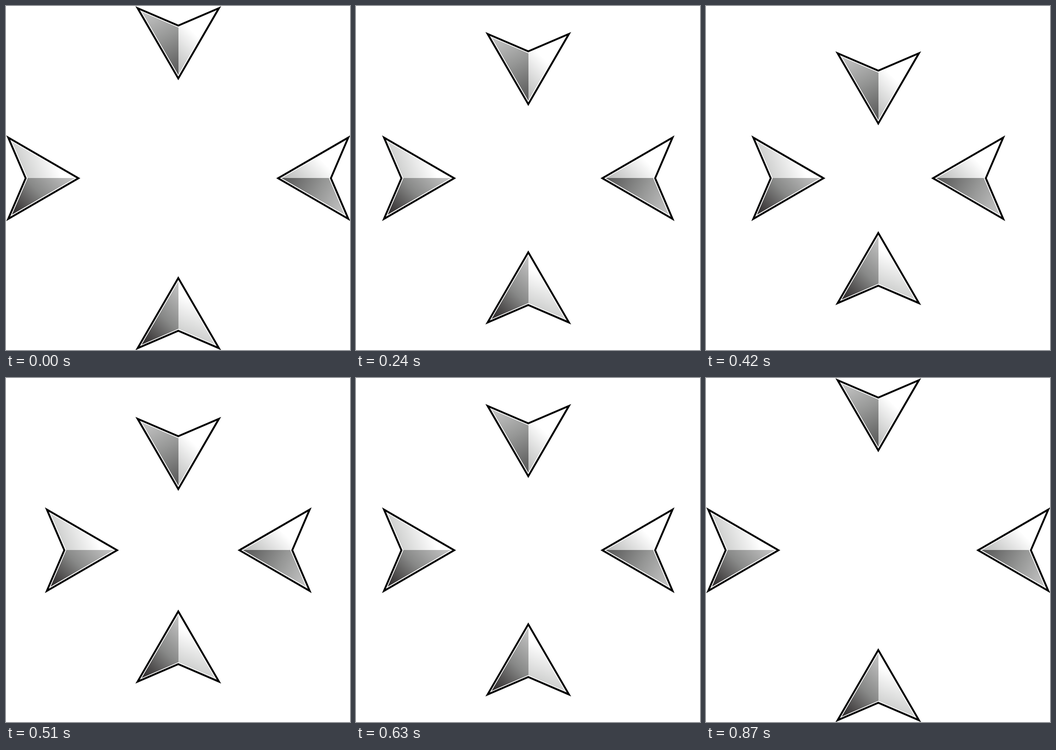
These frames come from a looping animation (748 px wide and 748 px high, 0.9 s). An HTML page:

```html
<!DOCTYPE html>
<html lang="en">
<head>
<meta charset="utf-8">
<title>Converging arrows</title>
<style>
html, body { margin: 0; width: 100%; height: 100%; overflow: hidden; background: #fff; }
svg { display: block; width: 748px; height: 748px; }
.half { shape-rendering: crispEdges; }
.line { fill: none; stroke-miterlimit: 10; }
</style>
</head>
<body>
<svg viewBox="0 0 748 748">
  <defs>
    <linearGradient id="topDark" gradientUnits="userSpaceOnUse" x1="-80" y1="-361" x2="-9" y2="-219">
      <stop offset="0" stop-color="#c6c6c6"/>
      <stop offset=".45" stop-color="#969796"/>
      <stop offset="1" stop-color="#555"/>
    </linearGradient>
    <linearGradient id="topLight" gradientUnits="userSpaceOnUse" x1="80" y1="-361" x2="-28" y2="-253">
      <stop offset=".42" stop-color="#fff"/>
      <stop offset="1" stop-color="#b8b9b8"/>
    </linearGradient>
    <linearGradient id="lowDark" gradientUnits="userSpaceOnUse" x1="0" y1="225" x2="-108" y2="333">
      <stop offset="0" stop-color="#c6c6c6"/>
      <stop offset=".5" stop-color="#888988"/>
      <stop offset="1" stop-color="#2a2627"/>
    </linearGradient>
    <linearGradient id="lowLight" gradientUnits="userSpaceOnUse" x1="0" y1="225" x2="-36" y2="315">
      <stop offset=".25" stop-color="#fff"/>
      <stop offset="1" stop-color="#d0d1d0"/>
    </linearGradient>
    <g id="top">
      <path class="half" fill="url(#topDark)" d="M0-217L-88.5-369.8 0-331.8z"/>
      <path class="half" fill="url(#topLight)" d="M0-217L88.5-369.8 0-331.8z"/>
      <path id="edge" class="line" d="M0-217L-88.5-369.8 0-331.8 88.5-369.8z" stroke="#fff" stroke-width="7.6"/>
      <path class="line" d="M0-217L-88.5-369.8 0-331.8 88.5-369.8z" stroke="#000" stroke-width="4"/>
    </g>
    <g id="low">
      <path class="half" fill="url(#lowDark)" d="M0 217L-88.5 369.8 0 331.8z"/>
      <path class="half" fill="url(#lowLight)" d="M0 217L88.5 369.8 0 331.8z"/>
      <path class="line" d="M0 217L-88.5 369.8 0 331.8 88.5 369.8z" stroke="#fff" stroke-width="7.6"/>
      <path class="line" d="M0 217L-88.5 369.8 0 331.8 88.5 369.8z" stroke="#000" stroke-width="4"/>
    </g>
  </defs>
  <g transform="translate(374.6 374.4)">
    <use href="#top" data-dir="1"/>
    <use href="#low" data-dir="-1"/>
    <!-- The side arrows mirror the vertical pair across the diagonal. -->
    <g transform="matrix(0 -1 -1 0 0 0)">
      <use href="#top" data-dir="1"/>
      <use href="#low" data-dir="-1"/>
    </g>
  </g>
</svg>
<script>
const LOOP = 900, TICK = 30, STRIDE = 7;
const arrows = document.querySelectorAll('use');
const start = performance.now();

function draw(now) {
  const tick = Math.floor(Math.max(0, now - start) % LOOP / TICK);
  const shift = STRIDE * Math.min(tick, LOOP / TICK - 1 - tick);
  for (const arrow of arrows) {
    arrow.setAttribute('transform', `translate(0 ${arrow.dataset.dir * shift})`);
  }
  requestAnimationFrame(draw);
}
draw(start);
</script>
</body>
</html>
```
